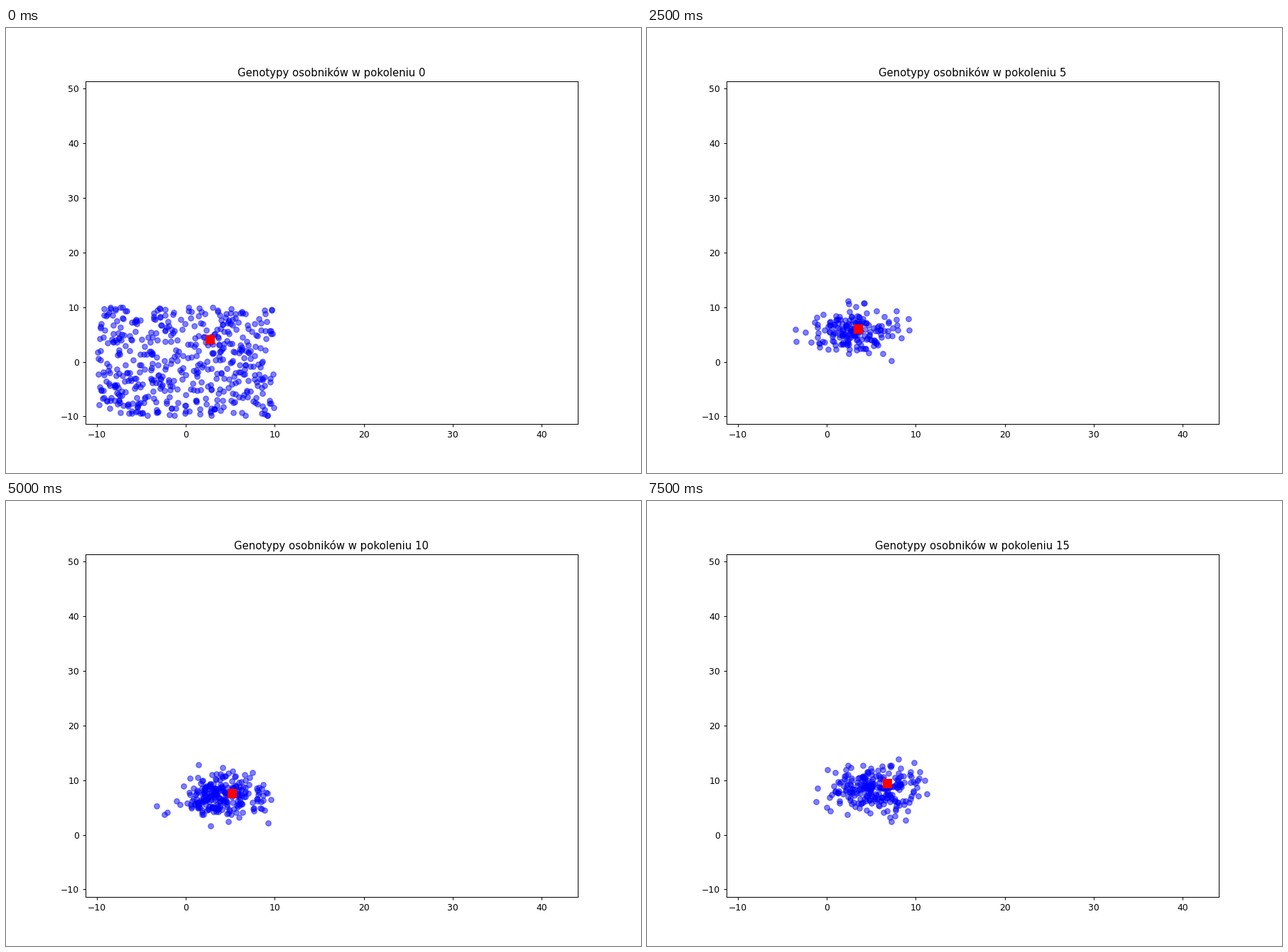
A matplotlib script for the animation above (8000 ms loop, 894 by 626 pixels).

```python
import matplotlib.pyplot as plt
import numpy as np
from matplotlib.animation import FuncAnimation

GENERATIONS = 16
INTERVAL = 500

# Path of the best individual: generation, x, y
BEST = np.array([(0, 2.75, 4.1), (3, 2.3, 6), (5, 3.5, 6), (7, 4.03, 6.3),
                 (10, 5.23, 7.65), (12, 5.87, 9), (15, 6.8, 9.45)]).T


def smoothstep(t):
    t = np.clip(t, 0, 1)
    return t * t * (3 - 2 * t)


def population(gen):
    """Uniform at the start, then a growing normal cloud that drifts up."""
    rng = np.random.default_rng(40 + gen)
    if gen == 0:
        return rng.uniform(-9.9, 10, (500, 2))
    size = int(min(250, 38 * 2.2 ** (gen - 3)))
    center = 3.4 + 1.9 * smoothstep((gen - 6) / 10), 4.6 + 0.33 * (gen - 3)
    return rng.normal(center, (2.4, 2.05), (size, 2))


# The height is a hair over 626 px so that truncation keeps the full row
fig, ax = plt.subplots(figsize=(10, 7.0023), dpi=89.4)
ax.set_xlim(-11.27, 44.03)
ax.set_ylim(-11.39, 51.28)
people, = ax.plot([], [], "bo", alpha=0.5)
best, = ax.plot([], [], "rs", markersize=10)
title = ax.set_title("")


def update(gen):
    people.set_data(*population(gen).T)
    best.set_data(*([np.interp(gen, BEST[0], path)] for path in BEST[1:]))
    title.set_text(f"Genotypy osobników w pokoleniu {gen}")
    return people, best, title


anim = FuncAnimation(fig, update, frames=GENERATIONS, interval=INTERVAL,
                     repeat=True, repeat_delay=0)
plt.show()
```
